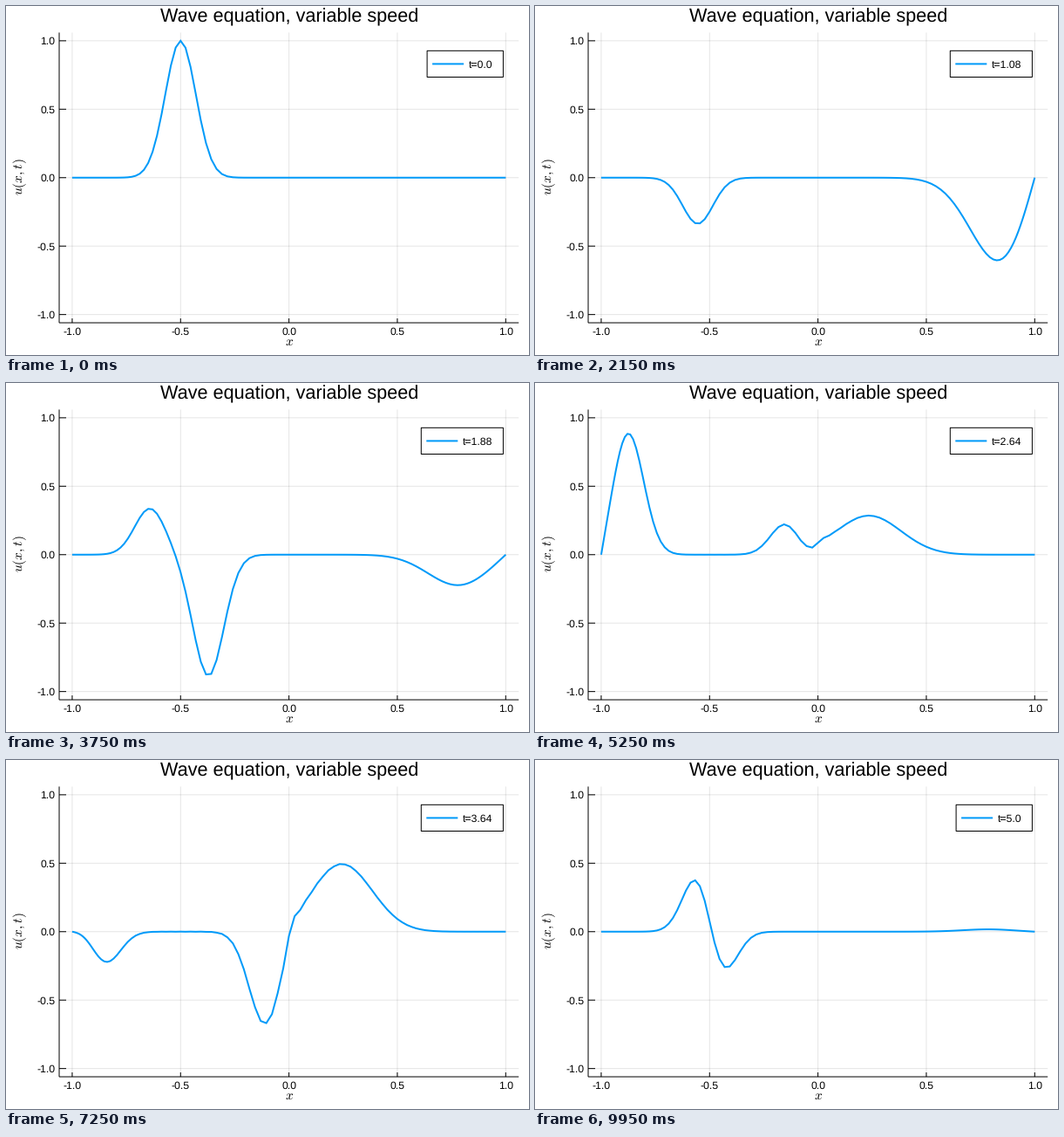
Animation, 600 px wide and 400 px high, one loop 10000 ms. Source, as a matplotlib script:

```python
import numpy as np
import matplotlib.pyplot as plt
from matplotlib.animation import FuncAnimation
from matplotlib.patches import Rectangle

plt.rcParams.update({
    "font.family": "Liberation Sans",
    "mathtext.fontset": "cm",
    "text.hinting": "none",
    "path.snap": False,
})

FRAMES, INTERVAL, T_END = 200, 50, 5.0
W, H, DPI = 600, 400, 100
LEFT, RIGHT, TOP, BOTTOM = 61.02, 588.2, 30.45, 363.05
LIMIT = 1.06
BLUE = "#009af9"
TICKS = (-1.0, -0.5, 0.0, 0.5, 1.0)


def pt(pixels):
    return pixels * 72 / DPI


def px(x):
    return LEFT + (x + LIMIT) / (2 * LIMIT) * (RIGHT - LEFT)


def py(u):
    return BOTTOM - (u + LIMIT) / (2 * LIMIT) * (BOTTOM - TOP)


def chebyshev(m):
    """Chebyshev points on [-1, 1] and their differentiation matrix."""
    k = np.arange(m + 1)
    x = -np.cos(np.pi * k / m)
    s = (-1.0) ** k
    s[[0, -1]] *= 2
    d = np.outer(s, 1 / s) / (x[:, None] - x + np.eye(m + 1))
    return x, d - np.diag(d.sum(axis=1))


# u_tt = (c^2 u_x)_x with fixed ends; the speed doubles right of x = 0.
x, D = chebyshev(120)
c = np.where(x > 1e-9, 2.0, 1.0)
pulse = np.exp(-100 * (x + 0.5) ** 2)
lam, modes = np.linalg.eig((D @ (c[:, None] ** 2 * D))[1:-1, 1:-1])
omega = np.sqrt(-lam + 0j).real
start = np.linalg.solve(modes, pulse[1:-1])
rate = np.linalg.solve(modes, -(D @ pulse)[1:-1]) / omega


def wave(t):
    u = np.zeros_like(x)
    u[1:-1] = (modes @ (np.cos(omega * t) * start
                        + np.sin(omega * t) * rate)).real
    return u


fig = plt.figure(figsize=(W / DPI, H / DPI), dpi=DPI, facecolor="white")
ax = fig.add_axes([0, 0, 1, 1])
ax.set_xlim(0, W)
ax.set_ylim(H, 0)
ax.axis("off")


def segment(x0, y0, x1, y1, color="black", width=1, **kw):
    return ax.plot([x0, x1], [y0, y1], color=color, lw=pt(width),
                   solid_capstyle="butt", **kw)[0]


def label(x0, y0, text, size=12.2, **kw):
    return ax.text(x0, y0, text, fontsize=pt(size), **kw)


for v in TICKS:
    segment(px(v), TOP, px(v), BOTTOM, alpha=0.1)
    segment(px(v), BOTTOM, px(v), BOTTOM - 5)
    label(px(v), 377.3, str(v), ha="center", va="baseline")
    segment(LEFT, py(v), RIGHT, py(v), alpha=0.1)
    segment(LEFT, py(v), LEFT + 8, py(v))
    label(56.5, py(v) + 4.2, str(v), ha="right", va="baseline")
segment(LEFT, TOP, LEFT, BOTTOM)
segment(LEFT, BOTTOM, RIGHT, BOTTOM)

label(325.1, 18, "Wave equation, variable speed", 21.65,
      ha="center", va="baseline")
label(324.6, 388.5, "$x$", 15.3, ha="center", va="baseline")
label(16, 196, "$u(x,t)$", 15.4, ha="center", va="center", rotation=90)

curve, = ax.plot([], [], color=BLUE, lw=pt(2), solid_joinstyle="miter",
                 solid_capstyle="butt", zorder=3)
curve.set_clip_path(Rectangle((LEFT, TOP), RIGHT - LEFT, BOTTOM - TOP,
                              transform=ax.transData))

BOX_RIGHT = 570.4
box = Rectangle((483, 51.3), 87, 30.2, fc="white", ec="black", lw=pt(1),
                zorder=4)
ax.add_patch(box)
sample = segment(489, 66.4, 525, 66.4, BLUE, 2, zorder=5)
clock = label(531, 71, "", va="baseline", zorder=5)


def draw(i):
    t = T_END * i / (FRAMES - 1)
    text = f"t={round(t, 2)}"
    left = 483.1 - 6.8 * (len(text) - 5)
    box.set_x(left)
    box.set_width(BOX_RIGHT - left)
    sample.set_xdata([left + 6, left + 42])
    clock.set_x(left + 48)
    clock.set_text(text)
    curve.set_data(px(x), py(wave(t)))
    return curve, box, sample, clock


anim = FuncAnimation(fig, draw, frames=FRAMES, interval=INTERVAL,
                     repeat=True, repeat_delay=0, blit=False)
plt.show()
```
